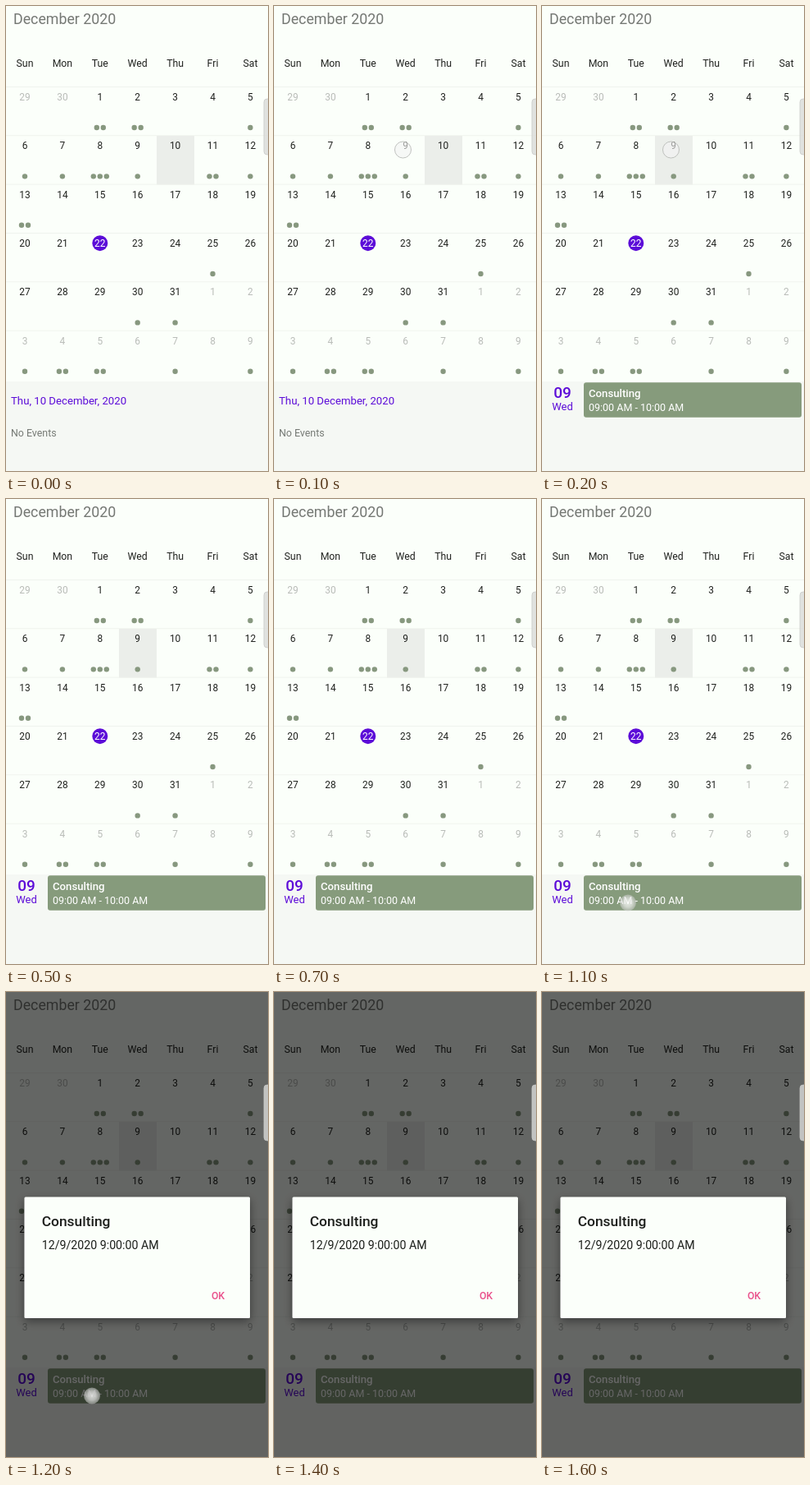
An HTML page for the animation above (1.7 s loop, 320 by 566 pixels).

```html
<!DOCTYPE html>
<html lang="en">
<head>
<meta charset="utf-8">
<title>Calendar</title>
<style>
html, body { margin: 0; width: 100%; height: 100%; overflow: hidden; background: #fbfffa; }
svg { display: block; width: 320px; height: 566px; font-family: Roboto, sans-serif; }
.mid { text-anchor: middle; }
.accent { fill: #5c0cd8; }
.bold { font-weight: 500; }
.before, .after, .tap1, .tap2, .modal { animation: 1.7s step-end infinite; }
.before { animation-name: before; }
.after { animation-name: after; }
.tap1 { animation-name: tap1; }
.tap2 { animation-name: tap2; }
.modal { animation-name: modal; }
@keyframes before { 0% { opacity: 1 } 11.76%, 100% { opacity: 0 } }
@keyframes after { 0% { opacity: 0 } 11.76%, 100% { opacity: 1 } }
@keyframes tap1 { 0% { opacity: 0 } 5.88% { opacity: 1 } 17.64%, 100% { opacity: 0 } }
@keyframes tap2 { 0% { opacity: 0 } 64.7% { opacity: 1 } 76.47%, 100% { opacity: 0 } }
@keyframes modal { 0% { opacity: 0 } 70.58%, 100% { opacity: 1 } }
</style>
</head>
<body>
<svg viewBox="0 0 320 566">
  <defs>
    <radialGradient id="glow">
      <stop offset="0" stop-color="#fff" stop-opacity=".8"/>
      <stop offset=".55" stop-color="#eee" stop-opacity=".7"/>
      <stop offset="1" stop-color="#ccc" stop-opacity=".5"/>
    </radialGradient>
    <filter id="shadow" x="-15%" y="-20%" width="130%" height="145%">
      <feDropShadow dx="0" dy="4" stdDeviation="6" flood-opacity=".42"/>
    </filter>
  </defs>

  <rect width="320" height="566" fill="#fbfffa"/>
  <rect y="457" width="320" height="109" fill="#f5f8f4"/>
  <text x="9" y="21.8" font-size="17.8" fill="#757874">December 2020</text>

  <rect class="before" x="184" y="158" width="46" height="59.5" fill="#ebeeea"/>
  <rect class="after" x="138" y="158" width="46" height="59.5" fill="#ebeeea"/>
  <g id="grid"></g>

  <g class="before">
    <text class="accent" x="6" y="484.5" font-size="13.2">Thu, 10 December, 2020</text>
    <text x="6" y="523.5" font-size="12.4" fill="#767a75">No Events</text>
  </g>

  <g class="after">
    <text class="mid accent bold" x="25" y="476.8" font-size="19">09</text>
    <text class="mid accent" x="25" y="492" font-size="13">Wed</text>
    <rect x="51" y="458.3" width="266" height="42.4" rx="3" fill="#869b7c"/>
    <g fill="#fff">
      <text class="bold" x="57" y="475.6" font-size="13.2">Consulting</text>
      <text x="57" y="493" font-size="12.5">09:00 AM - 10:00 AM</text>
    </g>
  </g>

  <g class="modal">
    <rect width="320" height="566" fill-opacity=".6"/>
    <rect x="22.5" y="249.5" width="275.5" height="147.5" rx="1.5" fill="#fbfffa" filter="url(#shadow)"/>
    <g fill="#1d1f1c">
      <text class="bold" x="43.7" y="285.2" font-size="17.4">Consulting</text>
      <text x="43.7" y="313" font-size="14.2">12/9/2020 9:00:00 AM</text>
    </g>
    <text class="mid bold" x="259" y="374" font-size="12.3" fill="#e9508b">OK</text>
  </g>

  <rect x="315" y="113" width="12" height="68" rx="4" fill="#d9dbd8" fill-opacity=".8" stroke="#c6c8c5" stroke-width=".7"/>
  <circle class="tap1" cx="157.5" cy="175" r="10" fill="#f4f4f4" fill-opacity=".6" stroke="#b9bbb8" stroke-width=".9"/>
  <circle class="tap2" cx="105" cy="491.5" r="10" fill="url(#glow)"/>
</svg>
<script>
const grid = document.getElementById('grid');
const COL = 45.9, ROW = 59.35, TOP = 98.5, TODAY = 23;
const events = [
  [0, 0, 2, 2, 0, 0, 1],
  [1, 1, 3, 1, 0, 2, 1],
  [2, 0, 0, 0, 0, 0, 0],
  [0, 0, 0, 0, 0, 1, 0],
  [0, 0, 0, 1, 1, 0, 0],
  [1, 2, 2, 0, 1, 0, 1]
];

function add(tag, attrs, text = '') {
  const el = document.createElementNS('http://www.w3.org/2000/svg', tag);
  for (const key in attrs) el.setAttribute(key, attrs[key]);
  el.textContent = text;
  grid.append(el);
}

function label(x, y, size, fill, text) {
  add('text', { class: 'mid', x, y, 'font-size': size, fill }, text);
}

const centre = col => 23 + col * COL;

['Sun', 'Mon', 'Tue', 'Wed', 'Thu', 'Fri', 'Sat'].forEach((name, col) =>
  label(centre(col), 73.6, 12.3, '#20221f', name));

events.forEach((week, row) => {
  const top = TOP + row * ROW;
  add('rect', { x: 0, y: top - 0.5, width: 320, height: 0.8, fill: '#edf1ec' });
  week.forEach((count, col) => {
    const x = centre(col), i = row * 7 + col;
    const day = (i + 28) % 30 + 1;
    const inMonth = i >= 2 && i < 33;
    const number = i < 2 ? day : inMonth ? i - 1 : i - 32;
    const today = i === TODAY;
    if (today) add('circle', { cx: x, cy: top + 12.1, r: 9.5, class: 'accent' });
    label(x, top + 16.4, 11.9, today ? '#fff' : inMonth ? '#20221f' : '#b9bcb8', number);
    for (let k = 0; k < count; k++) {
      add('circle', { cx: x + (k - (count - 1) / 2) * 8, cy: top + 49.5, r: 3.2, fill: '#87987f' });
    }
  });
});
</script>
</body>
</html>
```
